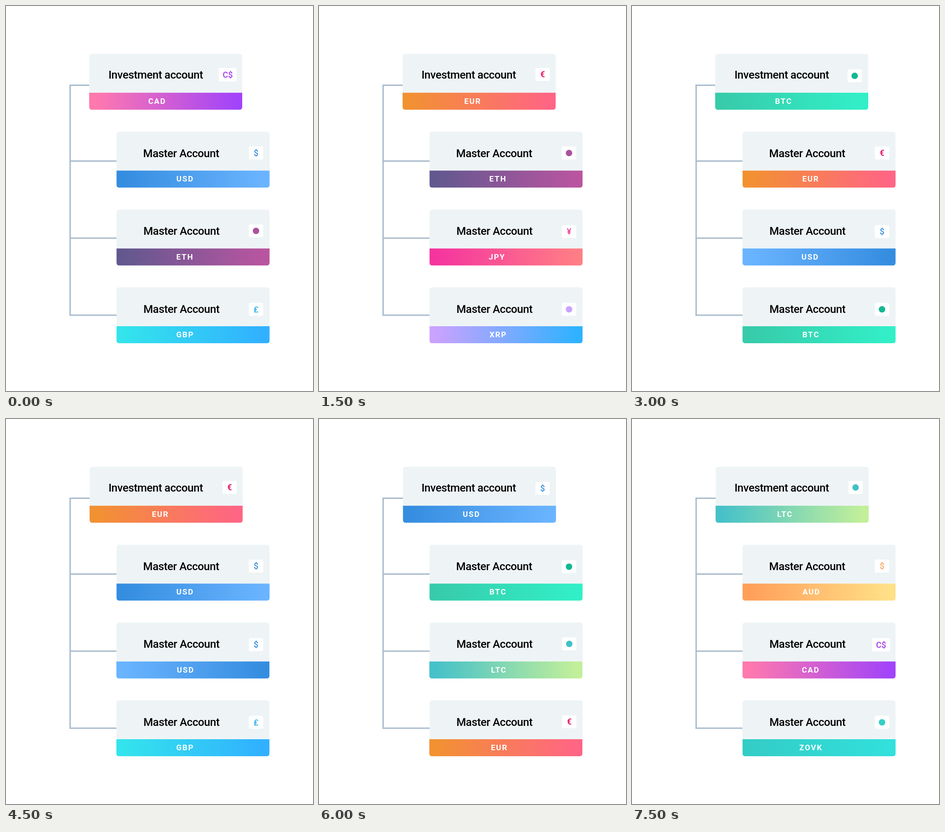
Write an HTML page that moves like this. It is 668x838 px and loops after 9 s.

```html
<!DOCTYPE html>
<html lang="en">
<head>
<meta charset="utf-8">
<title>Account currencies</title>
<style>
  html, body { margin: 0; width: 100%; height: 100%; overflow: hidden; background: #fff; }
  svg { display: block; width: 668px; height: 838px; font-family: Roboto, sans-serif; }
  .wires { fill: none; stroke: #a9bccd; stroke-width: 3; }
  .titles { font-size: 24px; font-weight: 500; letter-spacing: -.4px; }
  .label { font-size: 17px; font-weight: 700; letter-spacing: 1.8px; fill: #fff; text-anchor: middle; }
  .symbol { font-size: 18px; font-weight: 500; text-anchor: middle; }
  .scene { visibility: hidden; animation: show 9s step-end infinite; }
  @keyframes show {
    0% { visibility: visible; }
    16.666667%, 100% { visibility: hidden; }
  }
</style>
</head>
<body>
<svg viewBox="0 0 668 838">
  <defs id="defs"></defs>
  <path class="wires" d="M190 172.5H139.5V673H250M139.5 337.5H250M139.5 505.3H250"/>
  <g id="scenes"></g>
  <g class="titles">
    <text x="223" y="157.5">Investment account</text>
    <text x="298.3" y="328.5">Master Account</text>
    <text x="299" y="498">Master Account</text>
    <text x="299" y="667.5">Master Account</text>
  </g>
</svg>
<script>
  // Without a symbol, the badge holds a plain dot.
  const currencies = {
    CAD: { from: '#ff78ae', to: '#a244f9', ink: '#a33de8', symbol: 'C$' },
    USD: { from: '#358de0', to: '#6ab4ff', ink: '#358de0', symbol: '$' },
    ETH: { from: '#62588f', to: '#b955a0', ink: '#a9539c' },
    GBP: { from: '#33e4ec', to: '#31b0ff', ink: '#35b0ee', symbol: '₤' },
    EUR: { from: '#f29132', to: '#ff6584', ink: '#e5005f', symbol: '€' },
    JPY: { from: '#f5349f', to: '#ff7e85', ink: '#ea3590', symbol: '¥' },
    XRP: { from: '#caa2ff', to: '#2fb2ff', ink: '#caa2ff' },
    BTC: { from: '#37cbaa', to: '#32efc8', ink: '#10b892' },
    LTC: { from: '#46c1c9', to: '#c2ef9a', ink: '#41c1c5' },
    AUD: { from: '#ff9f5a', to: '#ffe088', ink: '#fba45c', symbol: '$' },
    ZOVK: { from: '#33cdc6', to: '#32e0dc', ink: '#34cfc9' },
  };

  const cardTops = [104, 273.5, 443, 612.3];
  const WIDTH = 333, HEAD = 84.7, BAR = 37, RADIUS = 6;

  // Each card: code, card x, label centre, badge x, badge y, bar shift
  const scenes = [
    [['CAD', 181, 328, 463, 135], ['USD', 240.5, 389, 528.5, 306],
     ['ETH', 240.5, 388.5, 528.5, 475.5], ['GBP', 240.5, 389, 528.5, 646.3]],
    [['EUR', 182.2, 333.5, 471, 135, -.3], ['ETH', 240.5, 388.5, 528.5, 306],
     ['JPY', 240.5, 386.5, 528.5, 477], ['XRP', 240.5, 389, 528.5, 646.3]],
    [['BTC', 181, 329, 469, 138], ['EUR', 240.5, 388, 528.5, 306],
     ['USD', 240.5, 387, 528.5, 477], ['BTC', 240.5, 388.5, 528.5, 646.3]],
    [['EUR', 182.2, 335, 471, 135, -.3], ['USD', 240.5, 389, 528.5, 306],
     ['USD', 240.2, 390, 528.5, 477], ['GBP', 240.2, 389, 528.5, 646.3]],
    [['USD', 182.7, 331, 471, 137], ['BTC', 240.5, 388.5, 528.5, 307.5],
     ['LTC', 240.7, 390.5, 529, 475.5, -.6], ['EUR', 240.7, 391.5, 529, 645, -.6]],
    [['LTC', 182.2, 332, 471, 135, -.3], ['AUD', 240.5, 389.5, 528.5, 306],
     ['CAD', 240.5, 388, 522.5, 477], ['ZOVK', 240.5, 388.5, 528.5, 646.3]],
  ];

  const gradient = (id, from, to) =>
    `<linearGradient id="${id}"><stop offset=".04" stop-color="${from}"/><stop offset=".96" stop-color="${to}"/></linearGradient>`;

  const roundedTop = (x, y) =>
    `M${x} ${y + HEAD}V${y + RADIUS}q0-${RADIUS} ${RADIUS}-${RADIUS}h${WIDTH - 2 * RADIUS}q${RADIUS} 0 ${RADIUS} ${RADIUS}V${y + HEAD}z`;

  const roundedBottom = (x, y) =>
    `M${x} ${y}h${WIDTH}v${BAR - RADIUS}q0 ${RADIUS}-${RADIUS} ${RADIUS}h${2 * RADIUS - WIDTH}q-${RADIUS} 0-${RADIUS}-${RADIUS}z`;

  function badge(x, y, { symbol, ink }) {
    const width = symbol === 'C$' ? 39 : 31;
    const height = symbol === 'C$' ? 29 : 28;
    const cx = x + width / 2, cy = y + height / 2;
    const mark = symbol
      ? `<text class="symbol" x="${cx}" y="${cy + 6.2}" fill="${ink}">${symbol}</text>`
      : `<circle cx="${cx}" cy="${cy}" r="7" fill="${ink}"/>`;
    return `<rect x="${x}" y="${y}" width="${width}" height="${height}" rx="3" fill="#fff"/>${mark}`;
  }

  function card([code, x, labelX, badgeX, badgeY, barShift = 0], row) {
    const top = cardTops[row], barTop = top + HEAD;
    const fill = code === 'USD' && row === 2 ? 'USD-reversed' : code;
    return `<path d="${roundedTop(x, top)}" fill="#eef4f6"/>
      <path d="${roundedBottom(x + barShift, barTop)}" fill="url(#${fill})"/>
      <text class="label" x="${labelX + .9}" y="${barTop + 24.2}">${code}</text>
      ${badge(badgeX, badgeY, currencies[code])}`;
  }

  const { USD } = currencies;
  document.getElementById('defs').innerHTML =
    Object.entries(currencies).map(([code, c]) => gradient(code, c.from, c.to)).join('') +
    gradient('USD-reversed', USD.to, USD.from);

  document.getElementById('scenes').innerHTML = scenes.map((cards, i) =>
    `<g class="scene" style="animation-delay:${i * 1.5 - 9}s">${cards.map(card).join('')}</g>`).join('');
</script>
</body>
</html>
```
